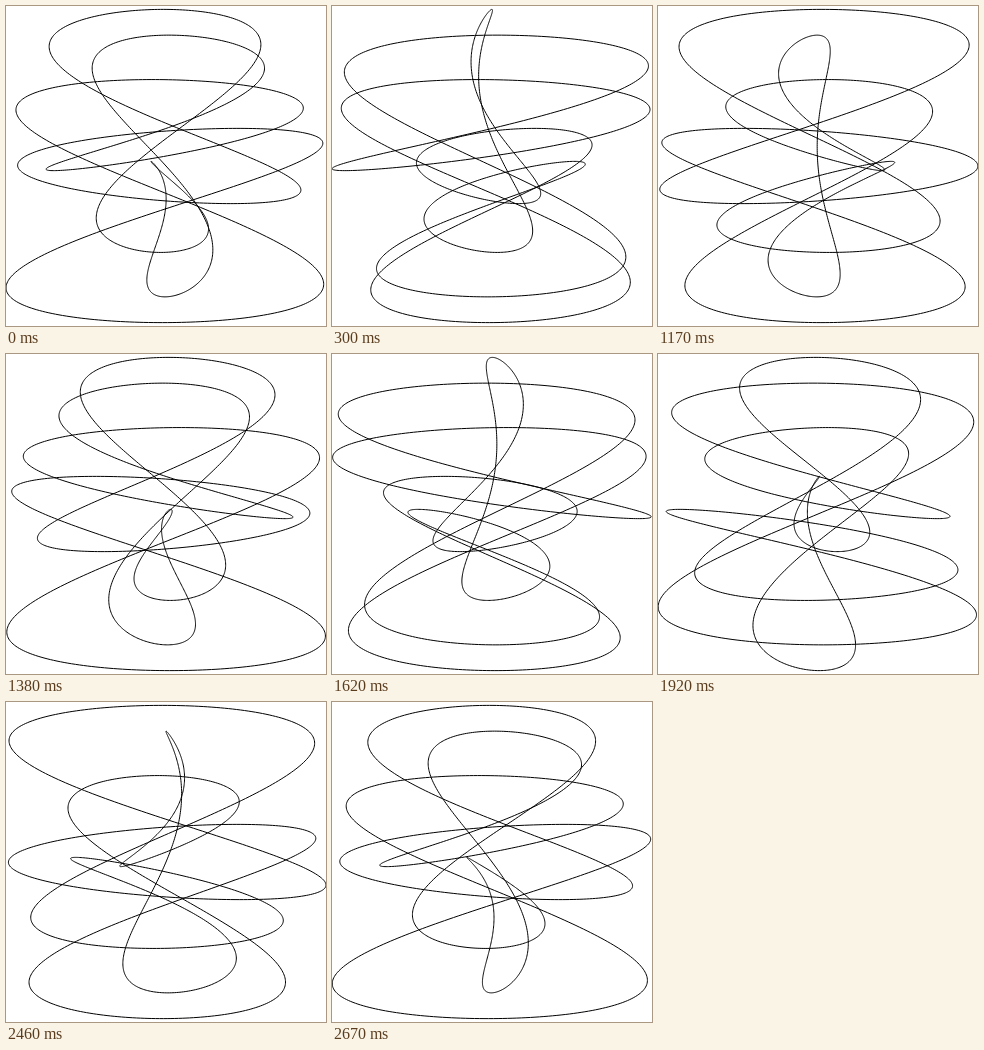
Write an HTML page with a canvas that moves like this. It is 320 px wide and 320 px high and loops after 2.7 s.

```html
<!DOCTYPE html>
<html lang="en">
<head>
<meta charset="utf-8">
<title>Turning curve</title>
<style>
  html, body { margin: 0; width: 100%; height: 100%; overflow: hidden; background: #fff; }
  canvas { display: block; width: 320px; height: 320px; }
</style>
</head>
<body>
<canvas id="stage" width="320" height="320"></canvas>
<script>
const SIZE = 320, MID = SIZE / 2;
const STEP_MS = 30, STEPS = 90;
const SEGMENTS = 1800;
const RAD = Math.PI / 180;
const START_PHASE = 22;

const ctx = document.getElementById('stage').getContext('2d');
ctx.lineWidth = 1;
ctx.lineJoin = 'round';
ctx.strokeStyle = '#000';
ctx.fillStyle = '#fff';

function point(a, phase) {
  return [
    MID + MID * Math.sin(8.5 * a) * Math.sin(phase - a / 2),
    MID + MID / 2 * (Math.sin(2 * a) + Math.sin(5 * a))
  ];
}

function draw(step) {
  const phase = (START_PHASE + step * 360 / STEPS) * RAD;
  ctx.fillRect(0, 0, SIZE, SIZE);
  ctx.beginPath();
  for (let i = 0; i < SEGMENTS; i++) {
    ctx.lineTo(...point(i / SEGMENTS * 2 * Math.PI, phase));
  }
  ctx.closePath();
  ctx.stroke();
}

const start = performance.now();
let shown = -1;

function tick() {
  const step = Math.floor((performance.now() - start) / STEP_MS) % STEPS;
  if (step !== shown) draw(shown = step);
  requestAnimationFrame(tick);
}
tick();
</script>
</body>
</html>
```
